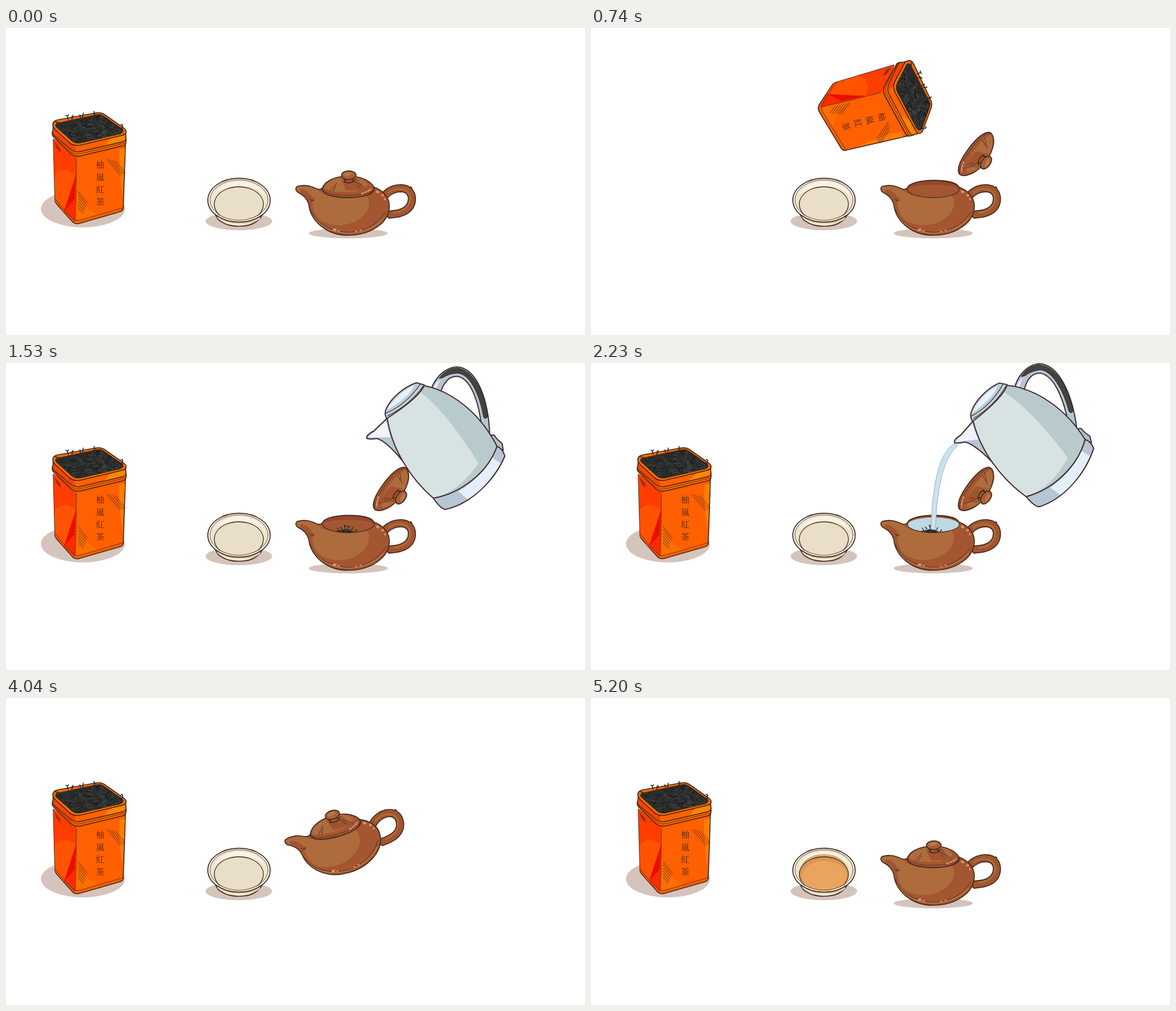
Animation, 1027 px wide and 545 px high, one loop 6.7 s. Source, as an HTML page:

```html
<!DOCTYPE html>
<html lang="en">
<head>
<meta charset="utf-8">
<title>Making tea</title>
<style>
  html, body { margin: 0; width: 100%; height: 100%; overflow: hidden; background: #fff; }
  svg { display: block; width: 100vw; height: 100vh; }
  path, ellipse { stroke-linecap: round; stroke-linejoin: round; }
  .line { fill: none; stroke: #40281c; stroke-width: 1.3; }
  .thin { fill: none; stroke: #40281c; stroke-width: .8; }
  .edge { stroke: #40281c; stroke-width: 1.7; }
  .steel { stroke: #432b2c; stroke-width: 2; }
  .shadow { fill: #d5c4bc; }
  .label { font: 15px "Noto Serif CJK TC", "Noto Sans CJK TC", "Noto Sans CJK JP", "Noto Sans CJK", serif; fill: #4a2410; text-anchor: middle; }
</style>
</head>
<body>
<svg viewBox="0 0 1027 545">
  <defs>
    <clipPath id="tinMouth"><path id="mouthShape" d="M90 169 L160 154 Q168 152 173 156 L206 179 Q211 184 203 188 L133 204 Q122 206 116 200 L89 176 Q86 172 90 169Z"/></clipPath>
    <clipPath id="potBody"><path id="potShape" d="M561 284 C556 289 550 285 543 282 C535 279 525 279 517 281 C512 284 514 290 520 293 C528 297 534 303 537 313 C540 343 569 368 607 368 C645 368 680 347 680 316 C680 300 668 288 652 282 C648 266 567 266 561 284Z"/></clipPath>
    <clipPath id="potMouth"><ellipse cx="607" cy="286" rx="46" ry="15.2"/></clipPath>
    <clipPath id="bowlFloor"><ellipse cx="413" cy="312" rx="43.5" ry="30"/></clipPath>
  </defs>

  <ellipse id="tinShadow" class="shadow" cx="136.5" cy="321" rx="74.5" ry="33"/>
  <ellipse class="shadow" cx="413" cy="343" rx="59" ry="16"/>
  <ellipse id="potShadow" class="shadow" cx="607" cy="364.5" rx="70" ry="9"/>

  <g id="bowl">
    <path class="edge" fill="#f1e7d0" d="M371 330 Q375 341 382 344 Q394 352 413 352 Q434 352 445 343 Q452 338 455 330Z"/>
    <path fill="#d9c9ac" d="M374 337 Q413 353 452 337 Q444 348 414 347 Q388 347 374 337Z"/>
    <ellipse class="edge" fill="#f7f1e3" cx="413.3" cy="305.7" rx="55.3" ry="39"/>
    <ellipse class="thin" style="fill:#efe5cf" cx="413.3" cy="305.3" rx="51.5" ry="35.8"/>
    <path fill="#f9f3e5" d="M369 297 Q380 275 413 272 Q449 273 460 299 Q446 280 413 280 Q382 282 369 297Z"/>
    <ellipse fill="#e9dec8" cx="413" cy="312" rx="43.5" ry="30"/>
    <g id="tea" clip-path="url(#bowlFloor)">
      <ellipse id="teaPool" fill="#d99653" cx="413"/>
      <ellipse id="teaLight" fill="#e9a45f" cx="414"/>
    </g>
    <path id="teaGlow" fill="#d9ad7b" d="M370 308 Q376 278 413 277 Q450 278 456 308 Q448 283 413 282 Q378 283 370 308Z"/>
    <path class="line" d="M378 332 C357 310 377 282 413 282 C449 282 469 310 448 332"/>
    <path class="thin" d="M378 332 Q413 351 448 332"/>
  </g>

  <g id="tin">
    <path class="edge" fill="#ff6000" d="M84 198 L87 307 Q88 311 92 315 L117 343 Q122 349 130 347 L203 326 Q208 324 208 319 L212 202 L125 222Z"/>
    <path fill="#ff3d00" d="M84 196 L87 307 L122 345 L125 224Z"/>
    <path fill="#ff5300" d="M86 262 Q101 243 123 260 L102 326 L88 309Z"/>
    <path fill="#e80f00" d="M124 262 L103 326 L122 304Z"/>
    <path fill="#ff2c00" d="M123 303 L104 326 L121 342Z"/>
    <path fill="#ff7e00" d="M201 216 L211 214 L207 300 Q200 260 201 216Z"/>
    <path fill="#ff6e00" d="M125 340 L126 289 Q137 320 165 332 L128 343Z"/>
    <path class="thin" d="M125 232 L124 300 L122 342 M88 304 Q101 323 119 339 Q123 343 132 341 L208 319"/>
    <path class="thin" id="tinHatch"/>
    <path class="edge" fill="#ff6200" d="M84 170 L83 184 Q80 190 86 195 L112 220 Q121 230 133 227 L208 209 Q214 207 213 198 L212 183Z"/>
    <path fill="#ff4200" d="M84 174 L84 188 L114 217 L124 220 L121 207Z"/>
    <path fill="#ff8600" d="M186 196 L211 190 L211 199 L172 211Z"/>
    <path class="line" d="M82 184 Q82 188 87 192 L113 214 Q122 222 133 219 L207 202 Q213 200 213 196"/>
    <path class="thin" d="M83 190 L112 217 Q122 226 133 223 L212 204"/>
    <path class="edge" fill="#ff6c00" d="M83 171 Q83 165 92 163 L158 151 Q168 149 174 153 L208 177 Q214 181 213 186 Q210 190 204 191 L132 208 Q120 210 113 204 L87 180 Q83 176 83 171Z"/>
    <use href="#mouthShape" class="thin" style="fill:#2a2d2b"/>
    <g clip-path="url(#tinMouth)" fill="none" stroke-width="1">
      <path class="strands" stroke="#141715"/><path class="strands" stroke="#464a47"/>
    </g>
    <path fill="none" stroke="#252928" stroke-width="1.7" d="M106 155 l3 1 l2 -2 M109 156 l1 6 M117 157 l0 5 M119 155 l-1 4 M131 154 l1 5 M137 151 l-1 7 M156 148 l1 5 M158 152 l-3 4 M204 171 l3 1 l-1 6 M87 166 l6 2"/>
    <g class="label"><text x="167" y="247.500">柚</text><text x="167" y="269.500">嵐</text><text x="167" y="291.500">紅</text><text x="167" y="313.500">茶</text></g>
  </g>

  <g id="fallingLeaves" fill="none" stroke="#252928" stroke-width="1.8"></g>

  <path id="teaStream" fill="#d99653" stroke="#a56632" stroke-width=".8" d="M428 244 Q415 269 414 323 Q417 328 421 323 Q421 274 434 249Z"/>
  <g id="pot">
    <path fill="none" stroke="#40281c" stroke-width="14.5" d="M673 296 C687 280 720 279 720 303 C720 323 702 330 682 331"/>
    <path class="edge" fill="#a25430" d="M709 284 Q716 285 718 282 Q721 284 719 288 L724 293 M678 330 Q675 336 680 338 Q684 337 685 333Z"/>
    <path fill="none" stroke="#a25430" stroke-width="11.2" d="M673 296 C687 280 720 279 720 303 C720 323 702 330 682 331"/>
    <path fill="none" stroke="#ae6c3c" stroke-width="3" d="M679 292 C691 282 715 283 717 302 C716 318 704 326 688 328"/>
    <use href="#potShape" fill="#a45631"/>
    <g clip-path="url(#potBody)">
      <path fill="#ae6c3c" d="M510 280 L545 281 Q558 293 565 295 Q602 307 640 298 C650 314 640 332 620 343 C598 354 570 352 554 338 Q544 327 543 306 Q526 292 510 291Z"/>
      <path fill="#a05432" d="M523 286 Q535 287 544 301 L548 307 Q540 310 537 313 Q531 298 520 293Z"/>
      <path fill="none" stroke="#bd7c4a" stroke-width="1.5" d="M542 329 Q559 362 605 364 Q648 363 669 338"/>
      <path class="thin" d="M540 322 Q552 357 606 363 Q652 361 674 326 M541 307 Q545 307 547 303 M538 303 L545 307"/>
      <g fill="#dc9971"><ellipse cx="583" cy="358" rx="3.5" ry="2"/><ellipse cx="590" cy="360" rx="2" ry="1.3"/><ellipse cx="621" cy="361" rx="2" ry="1"/><ellipse cx="629" cy="359" rx="2" ry="1"/><ellipse cx="659" cy="291" rx="3" ry="2" transform="rotate(28 659 291)"/><ellipse cx="668" cy="297" rx="2.5" ry="2"/><ellipse cx="672" cy="304" rx="1.5" ry="2"/></g>
    </g>
    <use href="#potShape" class="edge" fill="none"/>
    <ellipse class="line" style="fill:#a35632" cx="607" cy="286" rx="46" ry="15.2"/>
    <g clip-path="url(#potMouth)">
      <path fill="#974728" d="M561 286 Q565 272 607 272 Q649 272 653 286 Q642 278 607 278 Q572 278 561 286Z"/>
      <ellipse id="water" fill="#bfd9e2" cx="607.5"/>
      <g id="potLeaves">
        <path fill="#252928" d="M590 300 Q596 295 604 295 Q612 296 617 300 Q604 303 590 300Z"/>
        <path fill="none" stroke="#252928" stroke-width="1.4" d="M590 298 l-2 -5 M596 295 l-3 -4 M602 294 l-2 -6 l3 1 M607 294 l2 -4 l-4 0 M613 296 l2 -4 M619 300 l3 -4 M586 299 l8 -2"/>
        <path fill="none" stroke="#525956" stroke-width=".8" d="M593 299 l6 -4 M601 299 l8 -3 M607 294 l-5 3 M612 300 l4 -3"/>
      </g>
    </g>
  </g>
  <g id="lid">
    <path class="edge" fill="#a45631" d="M561 286 C563 274 580 263 607 263 C635 263 652 275 653 286 C650 298 625 301 607 301 C585 301 562 297 561 286Z"/>
    <path fill="#ae6c3c" d="M564 284 Q571 268 598 265 L623 265 Q636 269 642 278 Q632 291 602 291 Q574 291 564 284Z"/>
    <path fill="#a25430" d="M593 266 Q607 278 623 266 L636 287 Q618 289 603 288Z"/>
    <path class="thin" d="M562 287 Q570 297 607 297 Q645 296 652 287 M587 275 L574 290 M585 280 L580 290 M619 274 Q632 278 639 286 M622 279 L628 284"/>
    <path class="line" d="M599 268 Q607 280 620 268"/>
    <path class="edge" fill="#a25430" d="M600 266 Q604 271 600 273 Q609 277 618 272 Q612 270 616 266Z"/>
    <path class="edge" fill="#a85e36" d="M595 262 C595 251 620 251 621 261 C620 271 597 272 595 262Z"/>
    <path fill="#ba7746" d="M599 260 Q604 254 615 257 Q612 263 601 263Z"/>
    <path fill="none" stroke="#dc9971" stroke-width="2.5" stroke-dasharray="3 3" d="M631 294 Q642 291 647 286"/>
  </g>

  <path id="waterStream" fill="#cbe3ef" stroke="#8fb1c2" stroke-width="1"/>
  <g id="kettle">
    <path class="steel" fill="#b5c5d4" d="M754 47 C764 18 786 7 801 7 C836 10 856 66 858 128 L844 118 C840 75 827 31 803 24 C785 21 776 37 771 51Z"/>
    <path fill="#43433f" stroke="#302b2a" d="M768 27 Q782 9 801 9 C829 13 848 49 854 96 Q850 101 847 96 C840 55 822 18 800 18 Q785 19 775 26Z"/>
    <path fill="#e6eff8" d="M757 46 Q763 33 771 30 Q764 40 762 49Z"/>
    <path class="steel" fill="#aebfce" d="M857 128 L866 128 Q870 135 880 143 L882 155 L869 149Z"/>
    <path class="steel" fill="#b6c6d4" d="M676 98 L652 121 Q638 128 640 134 Q647 136 658 134 Q677 139 714 187 L694 137Z"/>
    <path fill="#eef4fa" d="M674 103 L653 123 Q643 128 643 132 Q665 132 682 132Z"/>
    <path fill="#b9cacd" d="M676 97 C684 151 716 204 758 240 C804 233 855 195 871 148 C844 95 797 51 741 40Z"/>
    <path fill="#d7e3e2" d="M676 97 C684 151 716 204 758 240 Q803 229 838 178 C805 125 765 72 729 47Z"/>
    <path class="steel" fill="none" d="M676 97 C684 151 716 204 758 240 C804 233 855 195 871 148 C844 95 797 51 741 40Z"/>
    <path class="steel" fill="#bdcedc" d="M675 99 Q670 89 675 80 C684 61 707 42 728 35 L742 39 Q735 60 675 99Z"/>
    <path fill="#e9f1fb" d="M677 81 Q698 50 724 40 Q718 58 677 83Z"/>
    <path class="line" d="M674 89 Q710 74 735 37 M677 94 Q718 73 740 41"/>
    <path class="steel" fill="#b5c6d5" d="M758 240 C805 232 854 196 871 148 Q880 151 885 165 C867 208 824 251 779 260 Q770 258 758 240Z"/>
    <path fill="#e4effa" d="M802 228 Q844 203 863 168 L877 178 Q854 220 819 242Z"/>
  </g>
</svg>

<script>
const LOOP = 6700;
const $ = id => document.getElementById(id);
const show = (id, on) => $(id).style.display = on ? "" : "none";
const set = (id, attrs) => Object.entries(attrs).forEach(([k, v]) => $(id).setAttribute(k, v));
const within = (t, from, to) => t >= from && t < to;
const clamp = v => Math.min(1, Math.max(0, v));
// Progress from 0 to 1 in equal jumps, the first one at `from`.
const steps = (t, from, length, count) => clamp((Math.floor((t - from) / length) + 1) / count);

let seed = 7;
const random = () => (seed = seed * 16807 % 2147483647) / 2147483647;

// Move the pivot by (dx, dy) and turn about it.
const pose = (id, x, y, dx, dy, angle) =>
  set(id, { transform: `translate(${x + dx} ${y + dy}) rotate(${angle}) translate(${-x} ${-y})` });
const rest = id => set(id, { transform: "" });

for (const path of document.querySelectorAll(".strands")) {
  let d = "";
  for (let i = 0; i < 125; i++) {
    const x = 86 + random() * 124, y = 152 + random() * 52, a = random() * 6.28;
    const dx = Math.cos(a) * 8, dy = Math.sin(a) * 5;
    d += `M${x} ${y}q${dx / 2 + 2} ${dy / 2 - 2} ${dx} ${dy}`;
  }
  path.setAttribute("d", d);
}

const hatch = (x, y, dx, dy, length, count) =>
  Array.from({ length: count }, (_, i) => `M${x + dx * i} ${y + dy * i}l${length * (1 - i * .09)} ${length * 1.2 * (1 - i * .09)}`).join("");
set("tinHatch", { d: hatch(128, 291, 0, 5.5, 16, 6) + hatch(179, 233, 5, 1, 24, 4) + hatch(86, 203, 1, 3, 10, 4) });

const leaves = Array.from({ length: 14 }, () => {
  const path = document.createElementNS("http://www.w3.org/2000/svg", "path");
  path.setAttribute("d", `M-3 ${random() * 4}q3 ${-4 * random()} 6 ${random() * 4}`);
  $("fallingLeaves").append(path);
  return { path, x: random(), delay: random(), turn: random() * 360 };
});

function draw(t) {
  const pouringLeaves = within(t, 740, 1430);
  const lidOff = within(t, 370, 2460);
  const potUp = within(t, 4040, 5200);
  const pouringTea = within(t, 4570, 5200);

  show("tinShadow", !pouringLeaves);
  const shake = steps(t, 870, 58, 6);
  if (pouringLeaves) pose("tin", 167, 275, 317 - 1.5 * shake, -109 - shake, 75 + 4.5 * shake);
  else rest("tin");

  show("fallingLeaves", within(t, 870, 1160));
  leaves.forEach(({ path, x, delay, turn }) => {
    const p = shake * 1.8 - delay * .8;
    path.style.display = p > 0 && p < 1 ? "" : "none";
    path.setAttribute("transform", `translate(${594 + x * 22} ${175 + 118 * p * p}) rotate(${turn + p * 90})`);
  });
  show("potLeaves", within(t, 990, 2460));

  for (const part of ["pot", "lid"]) {
    if (pouringTea) pose(part, 607, 310, -87, -99, -35);
    else if (potUp) pose(part, 607, 310, -16, -55.4, -15.5);
    else rest(part);
  }
  if (lidOff) pose("lid", 607, 283, 77, -58, 127);
  show("potShadow", !potUp);

  show("kettle", within(t, 1530, 2630));
  if (t >= 1700) pose("kettle", 765, 134, 4.5, -3, -5);
  else rest("kettle");
  show("waterStream", within(t, 1700, 2460));
  set("waterStream", { d: t < 1830
    ? "M643 144 Q623 158 613 205 Q611 216 616 219 Q624 175 650 147Z"
    : "M643 144 Q607 166 603 294 Q607 298 611 294 Q615 176 650 147Z" });
  show("water", within(t, 1830, 2460));
  const [rx, ry, cy] = t < 2030 ? [25, 4, 297] : t < 2230 ? [38, 8, 291] : [45.5, 13, 287];
  set("water", { rx, ry, cy });

  show("teaStream", pouringTea);
  show("tea", t >= 4570);
  const fill = steps(t, 4900, 30, 10);
  set("teaPool", { rx: 22 + 22 * fill, ry: 15 + 16 * fill, cy: 326 - 14 * fill });
  set("teaLight", { rx: 18 + 22 * fill, ry: 11 + 16 * fill, cy: 327 - 11 * fill });
  $("teaGlow").style.opacity = clamp(fill * 2 - 1);
}

const start = performance.now();
function tick() {
  draw((performance.now() - start) % LOOP);
  requestAnimationFrame(tick);
}
tick();
</script>
</body>
</html>
```
